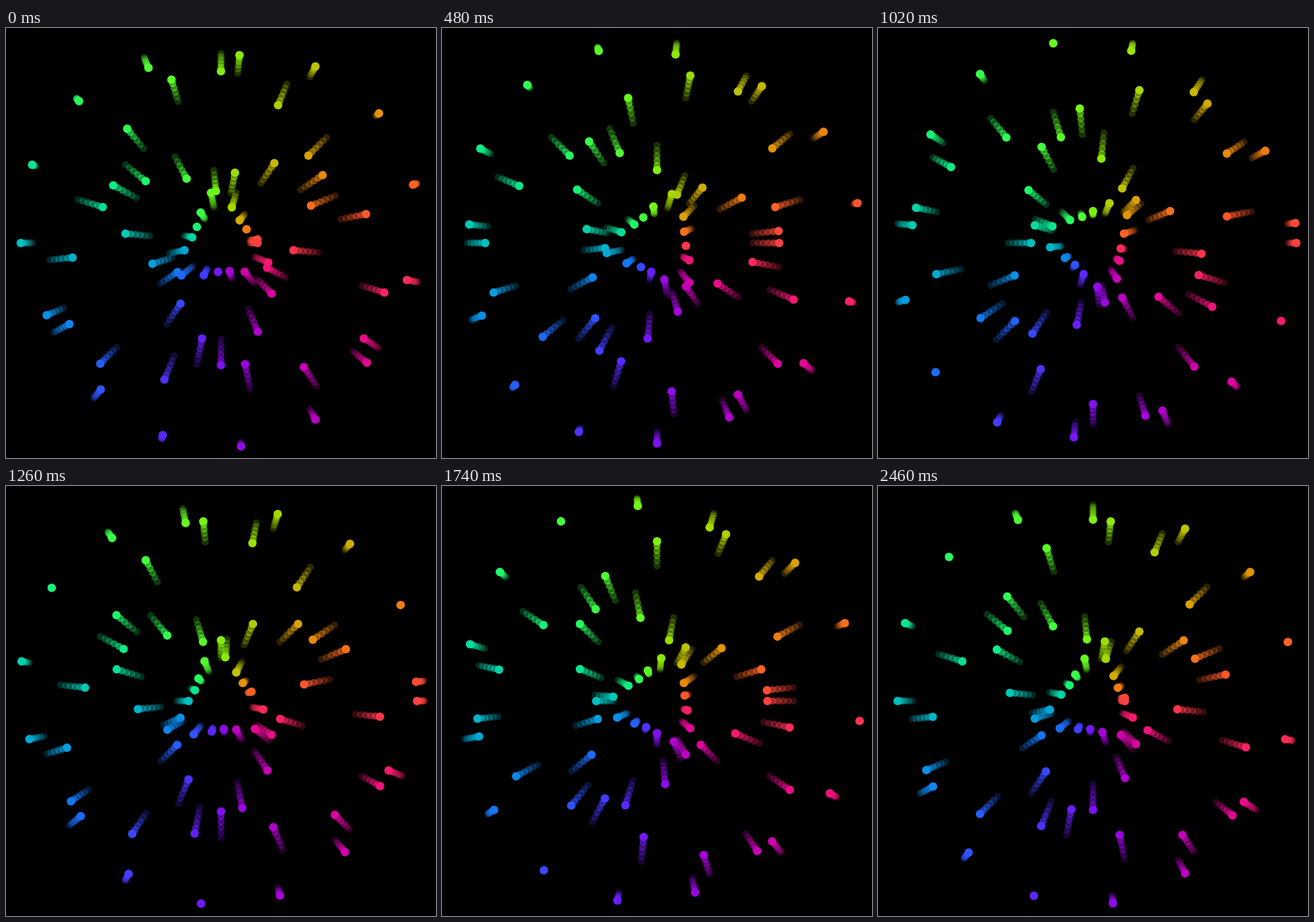
An HTML page with a canvas for the animation above (2520 ms loop, 610 px wide and 610 px high).

```html
<!DOCTYPE html>
<html lang="en">
<head>
<meta charset="utf-8">
<title>Radial dots</title>
<style>
  html, body { margin: 0; width: 100%; height: 100%; overflow: hidden; background: #000; }
  canvas { display: block; }
</style>
</head>
<body>
<canvas id="stage" width="610" height="610"></canvas>
<script>
const ctx = document.getElementById('stage').getContext('2d');
const TAU = Math.PI * 2;
const SIZE = 610, MID = SIZE / 2;
const STEP = 60, STEPS = 42;
const DOTS = 64, BEADS = 5;
const MEAN = 165, SWING = 125;
const START = 0.332;            // phase of the swing at time 0, in turns
const SHIFT = 5 / 21;           // phase from one spoke to the next
const LAG = 2 / STEPS / BEADS;  // phase from one bead to the next

// Squared cosines a third of a turn apart give an even rainbow.
function rainbow(turn) {
  const channel = offset => Math.round(255 * Math.cos(Math.PI * (turn - offset)) ** 2);
  return `rgb(${channel(0)},${channel(1 / 3)},${channel(2 / 3)})`;
}

function disc(angle, phase, radius, alpha) {
  const dist = MEAN + SWING * Math.cos(TAU * phase);
  ctx.globalAlpha = alpha;
  ctx.beginPath();
  ctx.arc(MID + dist * Math.cos(angle), MID - dist * Math.sin(angle), radius, 0, TAU);
  ctx.fill();
}

function draw(step) {
  ctx.globalAlpha = 1;
  ctx.fillStyle = '#000';
  ctx.fillRect(0, 0, SIZE, SIZE);
  for (let i = 1; i <= DOTS; i++) {
    const turn = i / DOTS;
    const phase = START + step / STEPS + i * SHIFT;
    ctx.fillStyle = rainbow(turn);
    for (let k = BEADS; k > 0; k--) {
      disc(turn * TAU, phase - k * LAG, 5, 0.7 - 0.11 * (k - 1) - 0.05);
    }
    disc(turn * TAU, phase, 6, 1);
  }
}

function tick() {
  draw(Math.floor(performance.now() / STEP) % STEPS);
  requestAnimationFrame(tick);
}
tick();
</script>
</body>
</html>
```
